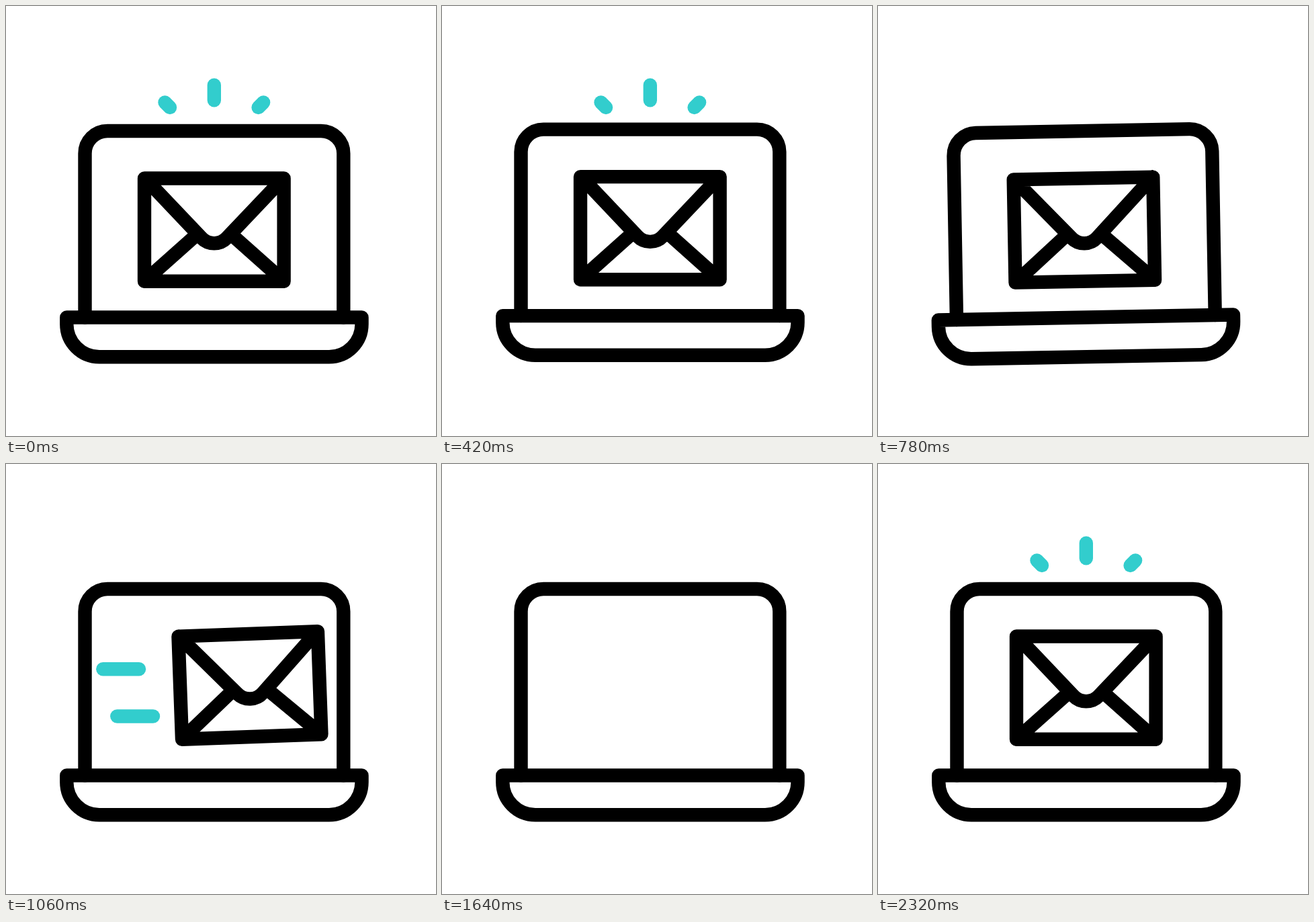
Animation, 640 px wide and 640 px high, one loop 3200 ms. Source, as an HTML page with a canvas:

```html
<!DOCTYPE html>
<html lang="en">
<head>
<meta charset="utf-8">
<title>Laptop mail</title>
<style>
  html, body { margin: 0; width: 100%; height: 100%; overflow: hidden; background: #fff; }
  canvas { display: block; width: 640px; height: 640px; }
</style>
</head>
<body>
<canvas id="stage" width="640" height="640"></canvas>
<script>
const LOOP = 3200;
const STEP = 20;
const TEAL = '#32cdcd';
const ctx = document.getElementById('stage').getContext('2d');

const progress = (t, from, to) => Math.min(1, Math.max(0, (t - from) / (to - from)));
const smooth = p => p * p * (3 - 2 * p);
const ease = (t, from, to) => smooth(progress(t, from, to));
const mix = (a, b, p) => a + (b - a) * p;
const radians = degrees => degrees * Math.PI / 180;

// Eased value along [time, value] keys
function track(t, keys) {
  if (t <= keys[0][0]) return keys[0][1];
  for (let i = 1; i < keys.length; i++) {
    const [t0, v0] = keys[i - 1], [t1, v1] = keys[i];
    if (t < t1) return mix(v0, v1, ease(t, t0, t1));
  }
  return keys[keys.length - 1][1];
}

const TILT = [[150, 0], [330, -2.08], [510, 2.08], [690, -2.08], [870, 0]];
const LIFT = [[150, 0], [420, -2.4], [690, 0]];

function rotateAbout(x, y, degrees) {
  ctx.translate(x, y);
  ctx.rotate(radians(degrees));
  ctx.translate(-x, -y);
}

// The part of a straight stroke between two fractions of its length
function trimmedLine([x0, y0, x1, y1], start, end) {
  if (end - start < 0.001) return;
  ctx.beginPath();
  ctx.moveTo(mix(x0, x1, start), mix(y0, y1, start));
  ctx.lineTo(mix(x0, x1, end), mix(y0, y1, end));
  ctx.stroke();
}

const RAYS = [
  [309.8, 140.2, 309.8, 117.8],
  [244, 151, 236.5, 143.5],
  [375.6, 151, 383.1, 143.5]
];
const SPEED_LINES = [
  [144.3, 305.3, 198, 305.3],
  [165.3, 375.5, 219, 375.5]
];

function drawRays(t) {
  const returning = t > 1900;
  const start = returning ? 0 : ease(t, 520, 730);
  const end = returning ? ease(t, 1945, 2320) : 1;
  RAYS.forEach(ray => trimmedLine(ray, start, end));
}

function drawSpeedLines(t) {
  const start = ease(t, 1245, 1640);
  const end = ease(t, 860, 1055);
  SPEED_LINES.forEach(line => trimmedLine(line, start, end));
}

function drawScreen() {
  ctx.beginPath();
  ctx.moveTo(117.5, 463.5);
  ctx.arcTo(117.5, 186, 310, 186, 33.5);
  ctx.arcTo(502.3, 186, 502.3, 463.5, 33.5);
  ctx.lineTo(502.3, 463.5);
  ctx.stroke();
}

function drawBase() {
  ctx.beginPath();
  ctx.moveTo(90.3, 463.5);
  ctx.arcTo(90.3, 522.2, 310, 522.2, 48.7);
  ctx.arcTo(529.5, 522.2, 529.5, 463.5, 48.7);
  ctx.lineTo(529.5, 463.5);
  ctx.closePath();
  ctx.stroke();
}

function drawEnvelope(t) {
  const leaving = t < 1800;
  const away = leaving ? progress(t, 897, 1257) : 1 - progress(t, 1975, 2320);
  if (away === 1) return;
  const shift = (leaving ? 310 : -310) * Math.pow(away, 2.16);

  ctx.save();
  ctx.beginPath();
  ctx.rect(117.5, 186, 384.8, 277);
  ctx.clip();
  ctx.translate(shift, 0);
  rotateAbout(206, 409.7, -4.57 * away);

  ctx.beginPath();
  ctx.rect(206, 256.5, 207.6, 153.2);
  ctx.moveTo(206.8, 256.5);
  ctx.arcTo(309.8, 365, 412.8, 256.5, 26);
  ctx.lineTo(412.8, 256.5);
  ctx.moveTo(206, 409.7);
  ctx.lineTo(281, 342.8);
  ctx.moveTo(413.6, 409.7);
  ctx.lineTo(338.6, 342.8);
  ctx.stroke();
  ctx.restore();
}

function draw(t) {
  ctx.fillStyle = '#fff';
  ctx.fillRect(0, 0, 640, 640);
  ctx.lineWidth = 20.4;
  ctx.lineCap = ctx.lineJoin = 'round';

  ctx.strokeStyle = TEAL;
  drawRays(t);
  drawSpeedLines(t);

  ctx.strokeStyle = '#000';
  ctx.save();
  ctx.translate(0, track(t, LIFT));
  rotateAbout(309.9, 493, track(t, TILT));
  drawEnvelope(t);
  drawScreen();
  drawBase();
  ctx.restore();
}

const begin = performance.now();
function tick() {
  const t = (performance.now() - begin) % LOOP;
  draw(Math.floor(t / STEP) * STEP);
  requestAnimationFrame(tick);
}
tick();
</script>
</body>
</html>
```
